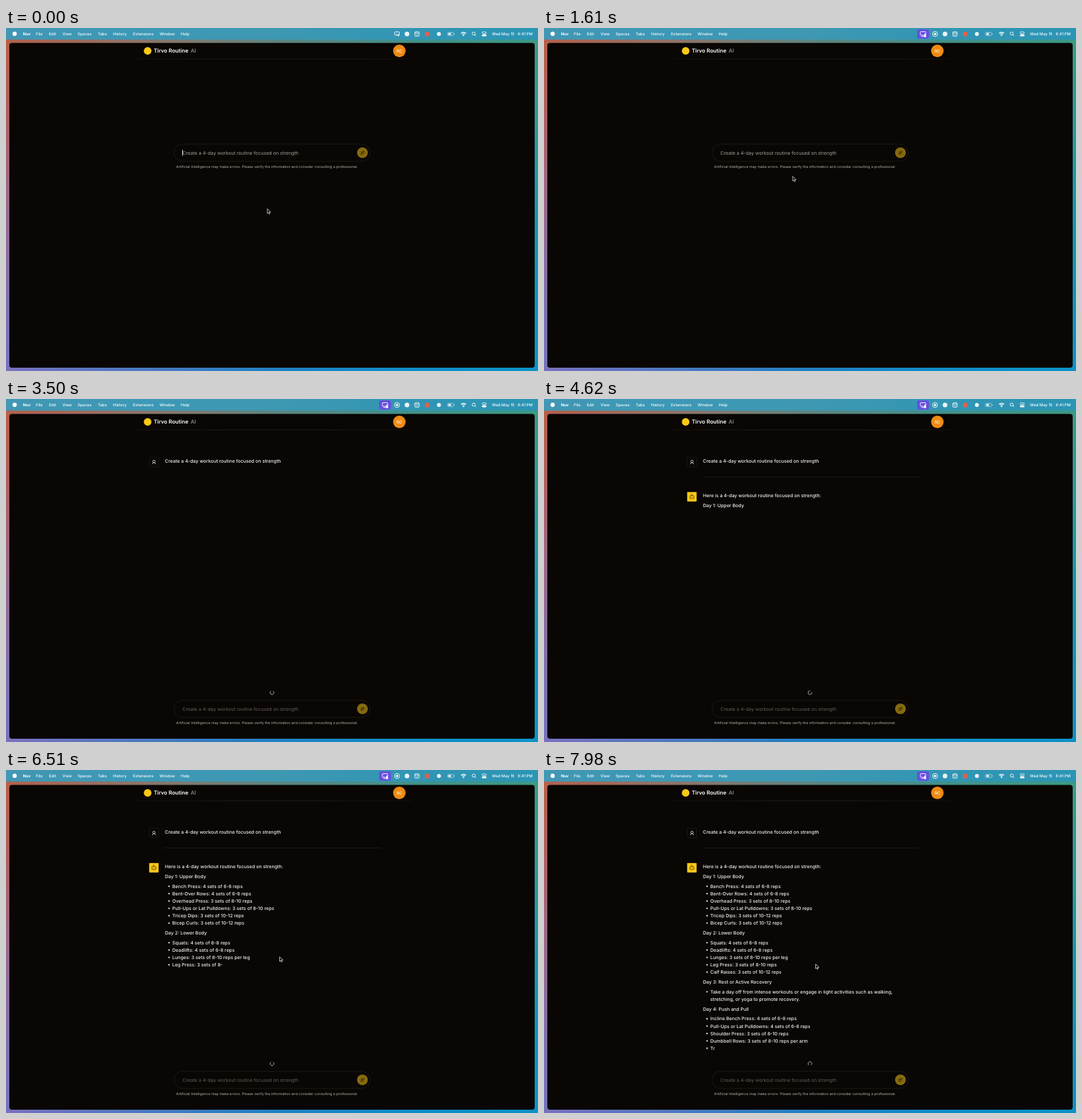
An HTML page with a canvas that plays this animation: 800 px wide and 517 px high, repeating every 8 s.

```html
<!DOCTYPE html>
<html lang="en">
<head>
<meta charset="utf-8">
<title>Workout chat</title>
<style>
html, body { margin: 0; width: 100%; height: 100%; overflow: hidden; background: #090604; }
canvas { display: block; width: 100vw; height: 100vh; }
</style>
</head>
<body>
<canvas id="stage"></canvas>
<script>
const W = 800, H = 517, LOOP = 8000, STEP = 70;
const SENT = 3500, REPLY = 4270;
const canvas = document.getElementById('stage');
const ctx = canvas.getContext('2d');
const dpr = Math.max(1, window.devicePixelRatio || 1);
canvas.width = W * dpr;
canvas.height = H * dpr;

const BG = '#090604', WHITE = '#f7f6f4', LINE = '#211e1a', YELLOW = '#fcc917';
const PROMPT = 'Create a 4-day workout routine focused on strength';
const NOTE = 'Artificial Intelligence may make errors. Please verify the information and consider consulting a professional.';

// '-' starts a list item, '~' continues one
const LINES = [
  'Here is a 4-day workout routine focused on strength:',
  'Day 1: Upper Body',
  '-Bench Press: 4 sets of 6-8 reps',
  '-Bent-Over Rows: 4 sets of 6-8 reps',
  '-Overhead Press: 3 sets of 8-10 reps',
  '-Pull-Ups or Lat Pulldowns: 3 sets of 8-10 reps',
  '-Tricep Dips: 3 sets of 10-12 reps',
  '-Bicep Curls: 3 sets of 10-12 reps',
  'Day 2: Lower Body',
  '-Squats: 4 sets of 6-8 reps',
  '-Deadlifts: 4 sets of 6-8 reps',
  '-Lunges: 3 sets of 8-10 reps per leg',
  '-Leg Press: 3 sets of 8-10 reps',
  '-Calf Raises: 3 sets of 10-12 reps',
  'Day 3: Rest or Active Recovery',
  '-Take a day off from intense workouts or engage in light activities such as walking,',
  '~stretching, or yoga to promote recovery.',
  'Day 4: Push and Pull',
  '-Incline Bench Press: 4 sets of 6-8 reps',
  '-Pull-Ups or Lat Pulldowns: 4 sets of 6-8 reps',
  '-Shoulder Press: 3 sets of 8-10 reps',
  '-Dumbbell Rows: 3 sets of 8-10 reps per arm',
  '-Tr'
];
const ANSWER = LINES.join('\n');
const after = s => ANSWER.indexOf(s) + s.length;
const TYPING = [
  [REPLY, 4],
  [4620, after('Upper Body')],
  [5740, after('Curls: 3 sets of 10-')],
  [6510, after('Leg Press: 3 sets of 8-')],
  [7980, ANSWER.length]
];
const POINTER_X = [[630, 393], [910, 374], [5180, 374], [5740, 406], [6510, 411.5], [7980, 408.5]];
const POINTER_Y = [[630, 272.5], [910, 223.5], [5180, 224], [5740, 257.5], [6510, 281.5], [7980, 292.5]];

function track(keys, t) {
  if (t <= keys[0][0]) return keys[0][1];
  for (let i = 1; i < keys.length; i++) {
    const [t0, a] = keys[i - 1], [t1, b] = keys[i];
    if (t <= t1) return a + (b - a) * (t - t0) / (t1 - t0);
  }
  return keys[keys.length - 1][1];
}

function text(s, x, y, size, color, weight = 400, align = 'left') {
  ctx.font = `${weight} ${size}px Inter, sans-serif`;
  ctx.textRendering = 'geometricPrecision';
  ctx.textAlign = align;
  ctx.fillStyle = color;
  ctx.fillText(s, x, y);
}

function rect(x, y, w, h, color) {
  ctx.fillStyle = color;
  ctx.fillRect(x, y, w, h);
}

function disc(x, y, r, color) {
  ctx.beginPath();
  ctx.ellipse(x, y, r, r, 0, 0, Math.PI * 2);
  ctx.fillStyle = color;
  ctx.fill();
}

function stroke(color, width) {
  ctx.strokeStyle = color;
  ctx.lineWidth = width;
  ctx.stroke();
}

function ring(x, y, r, color, width, from = 0, to = Math.PI * 2) {
  ctx.beginPath();
  ctx.ellipse(x, y, r, r, 0, from, to);
  stroke(color, width);
}

function box(x, y, w, h, r) {
  ctx.beginPath();
  ctx.roundRect(x, y, w, h, r);
}

function fillBox(x, y, w, h, r, color) {
  box(x, y, w, h, r);
  ctx.fillStyle = color;
  ctx.fill();
}

function line(color, width, ...pts) {
  ctx.beginPath();
  pts.forEach(([x, y], i) => i ? ctx.lineTo(x, y) : ctx.moveTo(x, y));
  stroke(color, width);
}

function fade(x0, y0, x1, y1, colors) {
  const g = ctx.createLinearGradient(x0, y0, x1, y1);
  colors.forEach((c, i) => g.addColorStop(i / (colors.length - 1), c));
  return g;
}

function drawFrame() {
  rect(0, 0, W, H, BG);
  rect(0, 17, W, 7, fade(0, 0, W, 0, ['#b4614d', '#8f7468', '#5f8580', '#43908a', '#3c9a83']));
  rect(0, 510, W, 7, fade(0, 0, W, 0, ['#7a70be', '#4c78c0', '#2080c2', '#0f8cc6', '#0c93c6']));
  rect(0, 20, 7, 494, fade(0, 20, 0, 514, ['#b85f48', '#ad6264', '#9a6a8c', '#8470aa', '#7672bc']));
  rect(793, 20, 7, 494, fade(0, 20, 0, 514, ['#3c9a83', '#2c9a97', '#1898ac', '#0d96bc', '#0c93c6']));
  fillBox(5, 22.5, 790, 489.5, 4, BG);
  rect(0, 0, W, 17.5, fade(0, 0, W, 0, ['#4197b4', '#3c98b6', '#3e98b2', '#3296b4', '#2b95b5']));
}

const MENU = [[45, 'File'], [64.5, 'Edit'], [85, 'View'], [107.8, 'Spaces'], [138, 'Tabs'],
  [161, 'History'], [191, 'Extensions'], [231, 'Window'], [262.8, 'Help']];

function drawMenu(recording) {
  disc(13, 8.8, 3.2, '#fff');
  text('Nuv', 25.4, 11, 5.9, '#fff', 700);
  for (const [x, s] of MENU) text(s, x, 11, 5.9, '#fff', 500);

  if (recording) {
    fillBox(561, 2, 18, 14, 3, '#6650de');
    box(566, 5.5, 8, 5.5, 1);
    stroke('#fff', 0.9);
    line('#fff', 0.9, [567.5, 12.7], [571, 12.7]);
    disc(573, 9.6, 1.2, '#fff');
    disc(573, 12.2, 1.7, '#fff');
    ring(588, 9, 3.8, '#fff', 0.9);
    fillBox(586.4, 7.4, 3.2, 3.2, 0.6, '#fff');
  } else {
    box(584.5, 5.8, 7, 5, 1);
    stroke('#fff', 0.9);
    line('#fff', 0.9, [587, 8.4], [590.5, 12.4], [590.5, 9.4]);
  }
  disc(603, 9, 3.5, '#e9f4f7');
  box(614.8, 5.7, 6.4, 6.6, 1.2);
  stroke('#fff', 0.9);
  line('#fff', 0.8, [615, 7.7], [621, 7.7]);
  line('#fff', 0.8, [616.5, 10], [619.5, 10]);
  rect(630, 5.7, 6.8, 6.8, '#e0604f');
  disc(651, 9, 3, '#e9f4f7');

  box(664, 6.5, 9, 5, 1.4);
  stroke('#c5e0e9', 0.7);
  rect(665.2, 7.7, 4, 2.6, '#fff');
  rect(674, 8.2, 0.8, 1.6, '#c5e0e9');
  for (const r of [1.9, 3.8, 5.7]) ring(688, 12, r, '#fff', 1.1, -2.3, -0.84);
  disc(688, 11.6, 0.8, '#fff');
  ring(703.3, 8.4, 2.3, '#fff', 0.9);
  line('#fff', 1, [705, 10.1], [706.8, 11.9]);
  box(716, 5.8, 6.2, 2.6, 1.3);
  stroke('#fff', 0.8);
  fillBox(715.6, 9.4, 7, 3, 1.5, '#fff');
  text('Wed May 15', 730.8, 11, 5.9, '#fff', 500);
  text('6:41 PM', 792, 11, 5.9, '#fff', 500, 'right');
}

function drawHeader() {
  disc(213, 34.5, 5.7, YELLOW);
  text('Tirvo Routine', 222.3, 37.3, 8.05, '#fff', 600);
  text('AI', 277.8, 37.3, 8.05, '#b5b0aa');
  rect(195, 46, 415, 0.8, fade(195, 0, 610, 0, ['#14110e', LINE, LINE, '#14110e']));
  disc(591.5, 34.5, 9.4, '#ee8b12');
  text('RC', 591.5, 36.8, 6.3, '#fff2dc', 500, 'center');
}

function drawInput(y, ink, caret) {
  box(252.5, y - 13, 295, 26, 13);
  stroke(LINE, 0.8);
  text(PROMPT, 265.3, y + 2.6, 7.12, ink);
  if (caret) rect(265, y - 4.5, 0.9, 9, '#fff');
  disc(536, y, 8.1, '#866a10');
  line('#2b210a', 0.8, [533.6, y + 2.4], [535, y - 1.4], [538.6, y - 2.2], [536.8, y + 2], [533.6, y + 2.4]);
  line('#2b210a', 0.7, [533.6, y - 1.2], [537, y + 0.2]);
  text(NOTE, 255.7, y + 22.6, 5.4, '#b7b2ab');
}

function drawQuestion() {
  box(215.5, 88, 14, 14, 1);
  stroke(LINE, 0.7);
  ring(222.5, 94, 1.8, '#e8e6e2', 0.8);
  ring(222.5, 98.3, 2.5, '#e8e6e2', 0.8, Math.PI, Math.PI * 2);
  text(PROMPT, 239, 95.8, 7.04, WHITE, 500);
}

function drawBot() {
  rect(238, 117.2, 325, 0.8, LINE);
  fillBox(215.3, 140.2, 14.2, 14.2, 0.6, YELLOW);
  box(219.4, 145.5, 6, 4.6, 0.9);
  stroke('#4a3a08', 0.8);
  line('#4a3a08', 0.8, [222.4, 145.4], [222.4, 143.7], [220.9, 143.7]);
  for (const x of [221.3, 223.5]) line('#4a3a08', 0.7, [x, 147.2], [x, 148.5]);
}

function drawAnswer(t) {
  let end = Math.floor(track(TYPING, t) + 0.001);
  // finish the word in progress
  while (/\w/.test(ANSWER[end - 1]) && /\w/.test(ANSWER[end] || ' ')) end++;
  let y = 148.1, inList = false;
  ANSWER.slice(0, end).split('\n').forEach((s, i) => {
    const item = /^[-~]/.test(s);
    if (i) y += item && inList ? 11.1 : 14.79;
    inList = item;
    if (s.length > 1 && s[0] === '-') disc(245.2, y - 2.4, 1.15, WHITE);
    text(item ? s.slice(1) : s, item ? 250 : 239, y, 7.04, WHITE, 500);
  });
}

function drawSpinner(t) {
  const a = (t - SENT) / 1000 * Math.PI * 2 - 0.94;
  ring(400, 442.6, 2.9, '#c4c0ba', 0.85, a, a + Math.PI * 1.6);
}

const ARROW = [[0, 0], [0, 7], [1.6, 5.5], [2.7, 8], [3.8, 7.5], [2.8, 5.1], [5, 5]];

function drawPointer(x, y) {
  ctx.beginPath();
  ARROW.forEach(([dx, dy]) => ctx.lineTo(x + dx, y + dy));
  ctx.closePath();
  ctx.fillStyle = '#000';
  ctx.fill();
  ctx.lineJoin = 'round';
  stroke('#e6e6e6', 0.8);
}

const caretOn = t => t < 490 || (t >= 1050 && t < 1610) || (t >= 2100 && t < 2590) || t >= 3150;

function draw(now) {
  const t = Math.floor(now % LOOP / STEP) * STEP;
  ctx.setTransform(dpr, 0, 0, dpr, 0, 0);
  drawFrame();
  drawMenu(t >= 210);
  drawHeader();
  if (t < SENT) {
    drawInput(188, '#a8a39c', caretOn(t));
  } else {
    drawQuestion();
    if (t >= REPLY) {
      drawBot();
      drawAnswer(t);
    }
    drawSpinner(t);
    drawInput(467, '#65605a', false);
  }
  if (t < SENT || t >= 5250) drawPointer(track(POINTER_X, t), track(POINTER_Y, t));
}

const start = performance.now();
function tick() {
  draw(performance.now() - start);
  requestAnimationFrame(tick);
}
tick();
</script>
</body>
</html>
```
